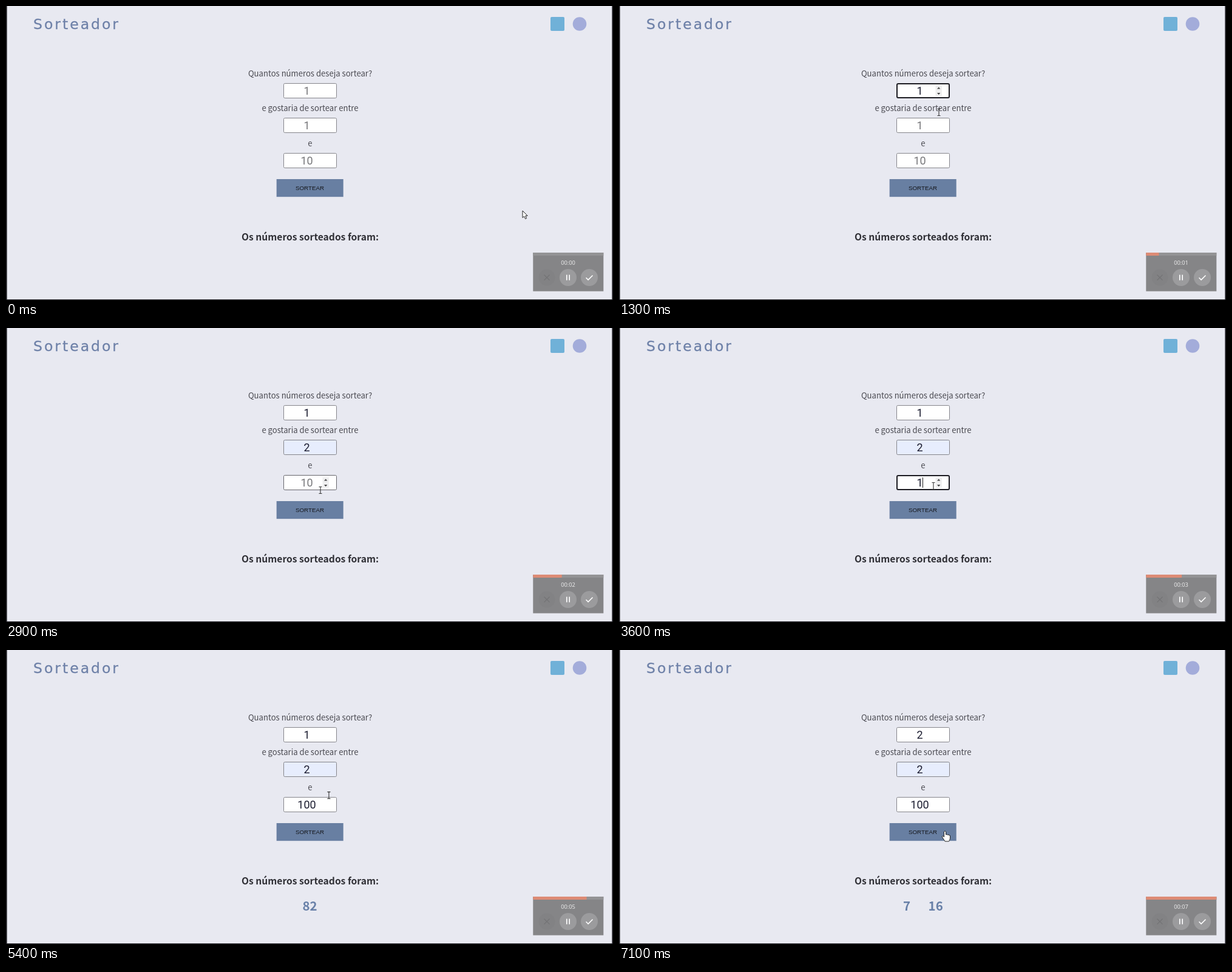
An HTML page for the animation above (7200 ms loop, 1000 by 484 pixels).

```html
<!DOCTYPE html>
<html lang="pt">
<head>
<meta charset="utf-8">
<title>Sorteador</title>
<style>
  html, body { margin: 0; width: 100%; height: 100%; overflow: hidden; background: #e8e9f1; }
  svg { display: block; width: 1000px; height: 484px; }
  text { text-anchor: middle; font-family: "Noto Sans CJK JP", "Noto Sans CJK SC", "Noto Sans CJK", "Noto Sans", sans-serif; }
  .title { font: 23.5px "DejaVu Sans", sans-serif; letter-spacing: 3px; text-anchor: start; fill: #6e81a8; stroke: #6e81a8; stroke-width: .3; }
  .label { font-size: 13.1px; fill: #4a4a51; }
  .head { font-size: 15.65px; font-weight: 700; fill: #303036; }
  .drawn { font-size: 20.5px; font-weight: 700; fill: #6880a8; }
  .value { font: 18px Roboto, Arial, sans-serif; }
  .button { font: 9.8px "Liberation Sans", Arial, sans-serif; fill: #15171c; }
  .clock { font: 9.3px "Open Sans", sans-serif; fill: #f0f0f0; }
  .option { font: 600 8.85px "Open Sans", sans-serif; fill: #eee; text-anchor: start; }
</style>
</head>
<body>
<svg viewBox="0 0 1000 484">
  <rect width="1000" height="484" fill="#e8e9f1"/>
  <path d="M.8 0V484M999.2 0V484" stroke="#17171c" stroke-width="1.6"/>
  <path d="M0 483.5H1000" stroke="#17171c"/>
  <text class="title" x="45" y="38.3">Sorteador</text>
  <rect x="897" y="18" width="23" height="23" rx="2" fill="#70b1d8"/>
  <circle cx="945" cy="29.5" r="11.3" fill="#a3acda"/>

  <text class="label" x="501" y="115.7">Quantos números deseja sortear?</text>
  <text class="label" x="501" y="173.2">e gostaria de sortear entre</text>
  <text class="label" x="501" y="231">e</text>
  <g id="fields"></g>
  <rect x="445.7" y="285" width="110" height="29.2" fill="#687fa2"/>
  <text class="button" x="500.5" y="303.3">SORTEAR</text>
  <text class="head" x="501" y="386.3">Os números sorteados foram:</text>
  <text class="drawn" id="one" x="500.5" y="429">82</text>
  <g id="two">
    <text class="drawn" x="474" y="429">7</text>
    <text class="drawn" x="521.7" y="429">16</text>
  </g>

  <g id="menu">
    <rect x="456" y="211" width="142" height="65" rx="3" fill="#000" opacity=".15"/>
    <rect x="457" y="210" width="140" height="64" rx="2" fill="#29292e"/>
    <text class="option" x="465" y="232.5">2019-11-30</text>
    <text class="option" x="465" y="258.5">2020-11-23</text>
  </g>

  <rect x="868.3" y="406" width="116" height="63.6" fill="#858587"/>
  <rect x="868.3" y="406" width="116" height="5" fill="#939395"/>
  <rect id="bar" x="868.3" y="406" height="5" fill="#dd8b75"/>
  <text class="clock" id="clock" x="926" y="425.5"></text>
  <circle cx="891" cy="447" r="13.5" fill="#828284"/>
  <circle cx="926" cy="447" r="14" fill="#9b9b9d"/>
  <circle cx="961" cy="447" r="14" fill="#9b9b9d"/>
  <path d="M886.5 442.5l9 9m0-9l-9 9" stroke="#737375" stroke-width="1.1"/>
  <path d="M923.8 442.5v9m4.4-9v9" stroke="#fff" stroke-width="1.7"/>
  <path d="M955.5 447.3l3.6 3.6 7.4-7.4" fill="none" stroke="#fff" stroke-width="1.5"/>

  <g id="cursor">
    <path id="arrow" d="M0 0V11.5L2.7 9.2 4.6 13.4 6.6 12.5 4.8 8.3H8.2Z" fill="#fff" stroke="#222" stroke-width="1"/>
    <path id="beam" d="M-2.5 -5.5H-.6L0 -5 .6 -5.5H2.5M0 -5V5M-2.5 5.5H-.6L0 5 .6 5.5H2.5" fill="none" stroke="#333" stroke-width="1.1"/>
    <path id="hand" d="M-1.5 1Q0 -1 1.5 1V6L3 5.5 4.5 6.5 6 6 7 7 8.5 7.5V12Q8 15 6.5 17H0L-4.5 10Q-5 8 -3.5 8L-1.5 10Z" fill="#fff" stroke="#222" stroke-width="1"/>
  </g>
</svg>
<script>
const LOOP = 7200, STEP = 100;
const $ = id => document.getElementById(id);
const show = (el, on) => el.style.display = on ? "" : "none";
const set = (el, attrs) => { for (const k in attrs) el.setAttribute(k, attrs[k]); };

// Pointer stops: time, x, y
const path = [
  [0, 851, 337], [100, 851, 337], [500, 536, 141], [800, 546, 151],
  [1100, 546, 151], [1500, 508, 199], [2200, 511, 209], [2500, 511, 212],
  [2900, 518, 267], [3100, 518, 258], [4100, 518, 262], [4600, 527, 292],
  [5200, 527, 293], [5700, 541, 140], [6000, 545, 142], [6400, 545, 144],
  [6800, 537, 298], [7200, 537, 298]
];
// Typed values: time, text ("" shows the placeholder)
const fields = [
  { y: 127, hint: "1", keys: [[0, ""], [700, "1"], [6200, ""], [6400, "2"]] },
  { y: 184, hint: "1", keys: [[0, ""], [2000, "2"]] },
  { y: 242, hint: "10", keys: [[0, ""], [3500, "1"], [3700, "10"], [3900, "100"]] }
];
// Focus changes: time, field index
const focus = [[0, -1], [500, 0], [1600, 1], [2500, -1], [3100, 2], [4900, -1], [5800, 0], [7000, -1]];
const latest = (list, t) => list.filter(e => e[0] <= t).pop();

for (const f of fields) {
  const g = document.createElementNS("http://www.w3.org/2000/svg", "g");
  g.innerHTML = `<rect rx="2"/>
    <text class="value" x="495.5" y="${f.y + 19}"></text>
    <path d="M0 ${f.y + 4}v17" stroke="#222" stroke-width="1"/>
    <g><rect x="521.5" y="${f.y + 4}" width="10.5" height="17" fill="#efeff0"/>
    <path d="M524 ${f.y + 9.5}l2.7 -3 2.7 3zM524 ${f.y + 16}l2.7 3 2.7 -3z" fill="#444"/></g>`;
  $("fields").append(g);
  [f.box, f.text, f.caret, f.spin] = g.children;
}

function pointer(t) {
  const i = path.findIndex(p => p[0] > t);
  const [t0, x0, y0] = path[i - 1], [t1, x1, y1] = path[i];
  const u = (t - t0) / (t1 - t0), k = u * u * (3 - 2 * u);
  return [x0 + (x1 - x0) * k, y0 + (y1 - y0) * k];
}

function draw(t) {
  const [x, y] = pointer(t), [since, active] = latest(focus, t);
  fields.forEach((f, i) => {
    const [typed, value] = latest(f.keys, t), on = i === active;
    const hover = Math.abs(x - 501) < 46 && y > f.y - 2 && y < f.y + 27;
    const line = on ? 2 : 1; // border grows inwards
    set(f.box, {
      x: 457 + line / 2, y: f.y + line / 2, width: 88 - line, height: 25 - line,
      fill: i === 1 && t >= 2500 ? "#e7edfd" : "#fff",
      stroke: on ? "#1c1c22" : hover ? "#66666c" : "#85858b",
      "stroke-width": line
    });
    f.text.textContent = value || f.hint;
    set(f.text, { fill: value ? "#1b1c30" : "#77777a" });
    set(f.caret, { transform: `translate(${495.5 + 5 * value.length})` });
    show(f.caret, on && (t - Math.max(since, typed)) % 1060 < 530);
    show(f.spin, on || hover);
  });
  show($("menu"), t >= 2000 && t < 2500);
  show($("one"), t >= 4900 && t < 7000);
  show($("two"), t >= 7000);
  set($("bar"), { width: 116 * t / 7100 });
  $("clock").textContent = "00:0" + Math.floor(t / 1000);

  const hand = x > 446 && x < 556 && y > 285 && y < 315;
  const beam = Math.abs(x - 501) < 48 && y > 100 && y < 270;
  set($("cursor"), { transform: `translate(${x} ${y})` });
  show($("hand"), hand);
  show($("beam"), beam);
  show($("arrow"), !hand && !beam);
}

const start = performance.now();
function tick() {
  const t = (performance.now() - start) % LOOP;
  draw(Math.floor(t / STEP) * STEP);
  requestAnimationFrame(tick);
}
tick();
</script>
</body>
</html>
```
